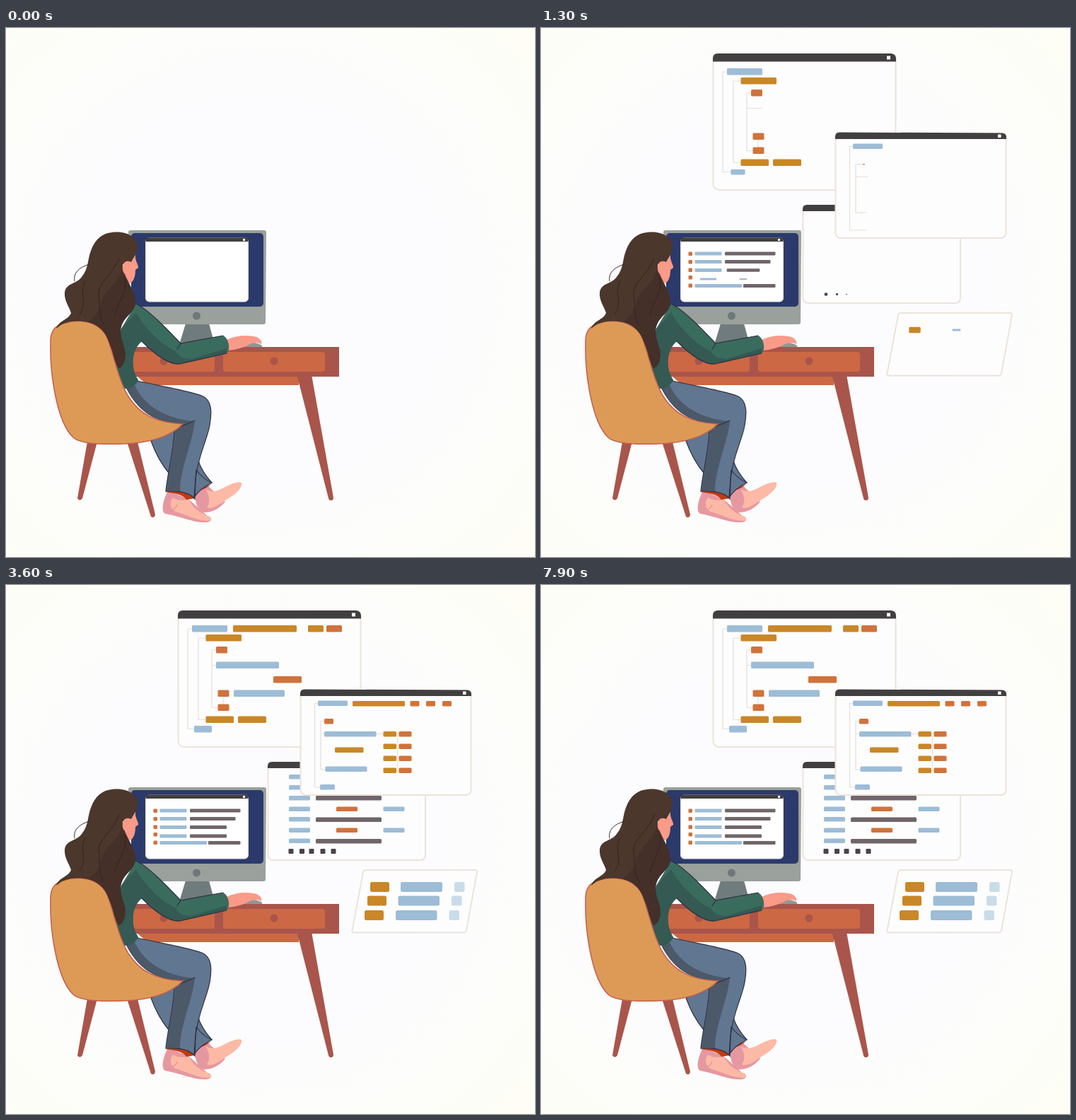
These frames come from a looping animation (748x748 px, 8000 ms). An HTML page without scripts:

```html
<!DOCTYPE html>
<html lang="en">
<head>
<meta charset="utf-8">
<title>At the desk</title>
<style>
@property --t { syntax: "<number>"; inherits: true; initial-value: 0; }
@keyframes clock { to { --t: 8; } }
html, body { margin: 0; width: 100%; height: 100%; overflow: hidden; background: #fcfcff; }
svg { display: block; width: 100vw; height: 100vh; animation: clock 8s steps(80) infinite; }

/* everything that pops grows from its centre; --s is its start in seconds */
.pop, .bars rect {
  --p: clamp(0, (var(--t) - var(--s)) / .35, 1);
  transform-box: fill-box;
  transform-origin: center;
  transform: scale(calc(var(--p) * var(--p) * (3 - 2 * var(--p))));
}
.bars rect { height: 9.5px; rx: 1.5px; }
.mid rect { height: 7.5px; }
.low rect { height: 6.5px; }
.card rect { height: 14px; rx: 2.5px; }
.mini rect { height: 5px; rx: 1px; }
.bars .dot { width: 7px; height: 7px; rx: 1px; }
.mini .dot { width: 5.5px; height: 5.5px; }
.blue { fill: #9dbcd6; }
.gold { fill: #c98727; }
.rust { fill: #d1723b; }
.grey { fill: #70666a; }
.pale { fill: #c9dce9; }
.dark { fill: #423f40; }
.pane { fill: #fdfdfe; stroke: #ebe4d9; stroke-width: 2; }
.tree { fill: none; stroke: #e4e0d8; stroke-width: 1.2; }
.wood { fill: #a9554b; }
.door { fill: #cc6844; }
.ink { fill: none; stroke: #2d2f42; stroke-width: 1.2; stroke-linecap: round; stroke-linejoin: round; }
.jean { fill: #617690; stroke: #2d2f42; stroke-width: 1.2; }
.skin { fill: #fcb9a6; }
.rose { fill: #e698a0; }
</style>
</head>
<body>
<svg viewBox="0 0 748 748">
<defs>
  <radialGradient id="bg" cx=".47" cy=".5" r=".72">
    <stop offset=".45" stop-color="#fcfcff"/>
    <stop offset="1" stop-color="#fefef6"/>
  </radialGradient>
</defs>
<rect width="748" height="748" fill="url(#bg)"/>

<!-- large window -->
<g class="pop" style="--s:.08">
  <rect class="pane" x="243.5" y="37" width="258" height="192" rx="8"/>
  <path class="dark" d="M243 47.500V43Q243 36 250 36H495Q502 37 502 43V47.500Z"/>
  <rect x="489" y="39.500" width="5" height="5" fill="#fff"/>
  <path class="tree" d="M263 62H257V203.500H283M283 75H272V190.500H294M297 92H291V173.500H300M291 113.500H313M307 152V170"/>
  <g class="bars">
    <g class="blue">
      <rect x="263" y="57" width="50" style="--s:.35"/>
      <rect x="297" y="108.500" width="89" style="--s:1.685"/>
      <rect x="322" y="148.500" width="72" style="--s:1.565"/>
      <rect x="266" y="199" width="25" style="--s:1.05"/>
    </g>
    <g class="gold">
      <rect x="321" y="57" width="90" style="--s:1.5"/>
      <rect x="427" y="57" width="22" style="--s:1.78"/>
      <rect x="282.500" y="70" width="50.500" style="--s:.42"/>
      <rect x="282.500" y="185.500" width="39.500" style="--s:.85"/>
      <rect x="328" y="185.500" width="40" style="--s:.95"/>
    </g>
    <g class="rust">
      <rect x="453" y="57" width="22" style="--s:1.88"/>
      <rect x="297" y="87" width="16" style="--s:.5"/>
      <rect x="378" y="129" width="40" style="--s:1.3"/>
      <rect x="299.500" y="148.500" width="16" style="--s:.76"/>
      <rect x="299.500" y="168.500" width="16" style="--s:.645"/>
    </g>
  </g>
</g>

<!-- list window -->
<g class="pop" style="--s:.86">
  <rect class="pane" x="370.500" y="251" width="222.500" height="138" rx="7"/>
  <path class="dark" d="M370 259V256Q370 250 376 250H587Q593 250 593 256V259Z"/>
  <g class="bars low">
    <g class="blue">
      <rect x="400" y="268" width="30" style="--s:1.4"/>
      <rect x="400" y="283" width="30" style="--s:1.7"/>
      <rect x="400" y="298" width="30" style="--s:1.8"/>
      <rect x="400" y="313.500" width="30" style="--s:1.9"/>
      <rect x="400" y="328" width="30" style="--s:2"/>
      <rect x="400" y="343.500" width="30" style="--s:2.1"/>
      <rect x="400" y="358.500" width="30" style="--s:2.2"/>
      <rect x="533.500" y="313.500" width="30" style="--s:2.665"/>
      <rect x="533.500" y="343.500" width="30" style="--s:2.78"/>
    </g>
    <g class="grey">
      <rect x="438" y="298" width="93" style="--s:1.35"/>
      <rect x="438" y="328.500" width="93" style="--s:1.45"/>
      <rect x="438" y="359" width="93" style="--s:1.59"/>
    </g>
    <g class="rust">
      <rect x="467" y="313.500" width="30" style="--s:2.88"/>
      <rect x="467" y="343.500" width="30" style="--s:2.98"/>
    </g>
    <g fill="#4b4345">
      <rect class="dot" x="399.500" y="373" style="--s:1.1"/>
      <rect class="dot" x="415" y="373" style="--s:1.15"/>
      <rect class="dot" x="428.500" y="373" style="--s:1.2"/>
      <rect class="dot" x="444.500" y="373" style="--s:1.25"/>
      <rect class="dot" x="459.500" y="373" style="--s:1.3"/>
    </g>
  </g>
</g>

<!-- middle window -->
<g class="pop" style="--s:.59">
  <rect class="pane" x="416.500" y="149" width="241" height="148" rx="7"/>
  <path class="dark" d="M416 157V153.500Q416 147.500 422 147.500L652 148.500Q658 149 658 154V157Z"/>
  <rect x="646" y="150.500" width="4.500" height="4.500" fill="#fff"/>
  <path class="tree" d="M463 167.500H436.500V286H460M455 192.500H445V261H460M445 210.500H462"/>
  <path class="tree pop" style="--s:1.5" d="M519 210.500H570"/>
  <path class="tree pop" style="--s:2.4" d="M542 228H565M542 245.500H565M542 262.500H565M553.500 211V263"/>
  <g class="bars mid">
    <g class="blue">
      <rect x="441" y="163.500" width="42" style="--s:.85"/>
      <rect x="450" y="207" width="73.500" style="--s:1.71"/>
      <rect x="451.500" y="256.500" width="59" style="--s:1.59"/>
      <rect x="444" y="282" width="21" style="--s:1.3"/>
    </g>
    <g class="gold">
      <rect x="490" y="164" width="74" style="--s:1.51"/>
      <rect x="465" y="229.500" width="40.500" style="--s:1.85"/>
      <rect x="533.500" y="207" width="18.500" style="--s:2.3"/>
      <rect x="533.500" y="224.500" width="18.500" style="--s:2.67"/>
      <rect x="533.500" y="241.500" width="18.500" style="--s:2.9"/>
      <rect x="533.500" y="258.500" width="18.500" style="--s:3.1"/>
    </g>
    <g class="rust">
      <rect x="450" y="189" width="13" style="--s:1.2"/>
      <rect x="555.500" y="207" width="18" style="--s:2.45"/>
      <rect x="555.500" y="224.500" width="18" style="--s:2.785"/>
      <rect x="555.500" y="241.500" width="18" style="--s:3"/>
      <rect x="555.500" y="258.500" width="18" style="--s:3.2"/>
      <rect x="571.500" y="164" width="13" style="--s:2.95"/>
      <rect x="594" y="164" width="13" style="--s:3.07"/>
      <rect x="617" y="164" width="13" style="--s:3.19"/>
    </g>
  </g>
</g>

<!-- slanted card -->
<g class="pop" style="--s:.785">
  <path class="pane" d="M509 403H663Q666.500 403 666 406L651 488.500Q650 491.500 647 491.500H492Q489 491.500 489.500 488.500L505 406Q506 403 509 403Z"/>
  <g class="bars card">
    <g class="gold">
      <rect x="515" y="420" width="27" style="--s:1.1"/>
      <rect x="511" y="439.500" width="27" style="--s:1.5"/>
      <rect x="507" y="460" width="27" style="--s:1.81"/>
    </g>
    <g class="blue">
      <rect x="558" y="420" width="59" style="--s:1.2"/>
      <rect x="554.500" y="439.500" width="58.500" style="--s:1.4"/>
      <rect x="551" y="460" width="58.500" style="--s:1.71"/>
    </g>
    <g class="pale">
      <rect x="634" y="420" width="14.500" style="--s:1.3"/>
      <rect x="630" y="439.500" width="14.500" style="--s:1.42"/>
      <rect x="626.500" y="460" width="14.500" style="--s:1.6"/>
    </g>
  </g>
</g>

<!-- desk -->
<path class="door" d="M186 493H414V505H200Z"/>
<path class="wood" d="M180 451H471V493H180Z"/>
<rect class="door" x="178" y="458" width="117" height="28" rx="4"/>
<rect class="door" x="307" y="458" width="144" height="28" rx="4"/>
<circle class="wood" cx="223" cy="471" r="5.500"/>
<circle class="wood" cx="379" cy="471" r="5.500"/>
<path class="wood" d="M412 493H432.500L463 664Q463 668 459.500 668Q456.500 668 456 665Z"/>

<!-- monitor -->
<path fill="#707b7d" d="M254 418H287L296 451H244Z"/>
<path fill="#9aa09b" d="M173 289Q173 286 176 286H365Q368 286 368 289L367 416Q367 419 364 419H180Z"/>
<rect x="177" y="290" width="187" height="104" rx="5" fill="#2b3a6b"/>
<circle cx="269.500" cy="407" r="5.500" fill="#6e777a"/>
<rect x="197.500" y="297" width="145" height="90" rx="5" fill="#fff" stroke="#e6e1dc"/>
<path class="dark" d="M197.500 302V299Q198 296.500 201 296.500H340L342.500 299V302Z"/>
<rect x="335" y="298" width="3" height="3" fill="#fff"/>
<g class="bars mini">
  <g class="rust">
    <rect class="dot" x="208.500" y="316.500" style="--s:.1"/>
    <rect class="dot" x="208.500" y="328" style="--s:.18"/>
    <rect class="dot" x="208.500" y="339.500" style="--s:.26"/>
    <rect class="dot" x="208.500" y="350" style="--s:.34"/>
    <rect class="dot" x="208.500" y="361.500" style="--s:.42"/>
  </g>
  <g class="blue">
    <rect x="217.500" y="316.500" width="38" style="--s:.53"/>
    <rect x="217.500" y="328" width="38" style="--s:.76"/>
    <rect x="217.500" y="340" width="38" style="--s:.93"/>
    <rect x="217.500" y="352.500" width="38" style="--s:1.1"/>
    <rect x="217.500" y="362" width="66.500" style="--s:.4"/>
  </g>
  <g class="grey">
    <rect x="260" y="316.500" width="71.500" style="--s:.65"/>
    <rect x="260" y="328" width="64.500" style="--s:.85"/>
    <rect x="260" y="340" width="52" style="--s:1.02"/>
    <rect x="260" y="352.500" width="52" style="--s:1.2"/>
    <rect x="286" y="362" width="45.500" style="--s:.48"/>
  </g>
</g>

<!-- hand and mouse -->
<path fill="#8f9896" d="M332 451Q348 440 362 449V451Z"/>
<path fill="#fa9a88" d="M312 441C324 435 338 434 350 436C358 437 363 443 361 447C355 444 350 445 345 447C336 452 325 455 314 456Z"/>

<!-- feet -->
<path class="rose" d="M268 656C266 668 270 682 280 685C292 685 302 679 310 670L284 646Z"/>
<path class="skin" d="M282 652C290 657 299 655 306 651C315 646 328 640 333 643C335 650 323 661 313 666C303 673 293 681 284 678C290 670 287 660 282 652Z"/>
<path class="rose" d="M229 654C222 668 218 685 226 687C246 690 264 700 284 699C292 698 291 692 286 691L258 666Z"/>
<path class="skin" d="M236 664C244 670 256 667 259 667C263 677 275 687 286 690C292 692 292 696 285 697C268 696 252 687 240 684C232 681 231 670 236 664Z"/>
<path d="M236 681Q241 678 242 674" fill="none" stroke="#d9808a"/>

<!-- jeans -->
<path fill="#c5390f" d="M268 655L290 645C285 650 278 653 268 656ZM225 656C236 652 258 656 267 665L255 667C250 659 238 658 225 656Z"/>
<path class="jean" d="M205 584C212 603 220 617 230 629L266 664C272 654 281 648 291 643C283 634 276 625 272 612L240 566Z"/>
<path class="jean" d="M170 508L186 499C215 506 255 512 277 520C292 526 291 545 288 562C284 584 271 606 268 638L267 666C260 657 245 654 226 655C229 625 238 596 238 566L250 560C212 557 188 544 170 508Z"/>
<path fill="#4b5969" d="M171 509L182 505C192 528 218 552 267 556C263 590 246 622 246 655L227 654.500C230 625 239 596 239 566L250 560C212 557 188 544 171 509Z"/>
<path class="ink" d="M238 566Q255 561 267 555M266 664L269 625Q279 638 291 643"/>

<!-- sweater -->
<path fill="#3a6c5e" d="M184 390C201 398 226 424 247 446L307 435C315 438 318 455 312 460L246 475C229 477 205 456 192 443C178 454 175 480 187 498C182 508 172 513 165 508L150 470L163 425Z"/>
<path fill="#345a53" d="M184 402C191 417 216 446 240 457L312 452V460L246 475C229 477 205 456 192 443C178 454 175 480 187 498C182 508 172 513 165 508L150 470L163 425Z"/>
<path fill="#3a6c5e" d="M240 456L312 447V453L262 468Q244 468 240 456Z"/>
<path class="ink" d="M184 390C201 398 226 424 247 446L307 435M247 446L242 454M312 460L246 475C229 477 205 456 192 443" stroke-width=".8"/>

<!-- chair -->
<path class="wood" d="M115 585H129L108 665Q104 670 101 665ZM171 585H186L211 688Q210 694 205 691Z"/>
<path id="seat" fill="#dd9a57" d="M63 446C62 425 72 418 92 415C116 412 136 420 144 440C153 466 160 500 173 521C189 546 211 558 250 560C231 579 200 587 165 588C139 589 106 589 95 579C72 557 62 490 63 446Z"/>
<path fill="#fcae5a" d="M111 415C130 415 139 426 144 440C153 466 160 500 173 521C189 546 211 558 250 560C227 573 190 578 143 577C126 553 110 510 105 468C101 439 103 424 111 415Z"/>
<use href="#seat" style="fill:none" fill="none"/>
<path fill="none" stroke="#c65f4c" stroke-width="1.500" d="M63 446C62 425 72 418 92 415C116 412 136 420 144 440C153 466 160 500 173 521C189 546 211 558 250 560C231 579 200 587 165 588C139 589 106 589 95 579C72 557 62 490 63 446Z"/>

<!-- head -->
<path fill="#fa9a88" d="M166 326L183 321C182 329 188 336 187 339L183 342C183 350 181 359 175 361C170 360 166 354 166 345Z"/>
<path fill="#4b372c" d="M150 289C171 286 187 297 186 309C186 318 181 323 177 331Q169 327 165 335C165 350 181 368 183 385C184 405 164 406 162 428C162 445 172 455 168 469Q165 480 159 481C153 470 151 456 144 440C136 420 116 412 92 415Q80 417 71 425C74 414 89 412 92 403C90 395 82 386 83 374C85 360 99 363 107 352C117 340 115 328 120 315C126 298 137 290 150 289Z"/>
<path fill="#452f29" d="M164 340C166 352 181 368 183 385C184 405 164 406 162 428C162 445 172 455 168 469Q165 480 159 481C153 470 151 456 144 440C138 425 128 418 116 415C137 401 132 385 143 372C154 360 161 355 164 340Z"/>
<path fill="#fa9a88" d="M166 335Q168 330 173 332Q176 339 172 346L167 347Q163 341 166 335Z"/>
<path class="ink" style="stroke:#33251f;stroke-width:1" d="M118 334C101 339 95 348 97 358M160 325C151 350 130 358 131 378C134 392 129 405 139 420M112 358C102 375 117 386 104 405M167 352C174 368 160 385 154 405"/>
</svg>
</body>
</html>
```
